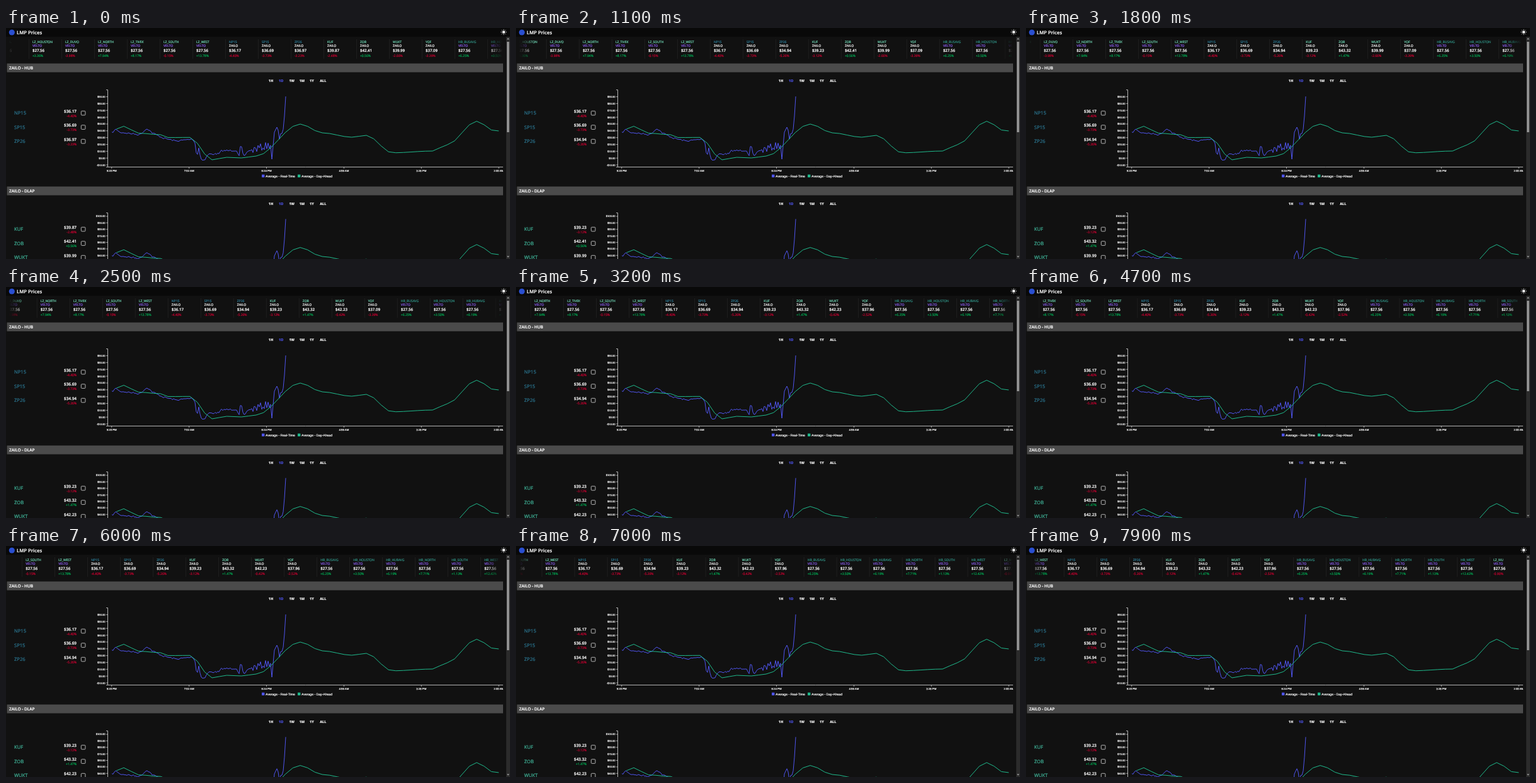
An HTML page with a canvas that plays this animation: 800 px wide and 368 px high, repeating every 8000 ms.

```html
<!DOCTYPE html>
<html lang="en">
<head>
<meta charset="utf-8">
<title>LMP Prices</title>
<style>
html, body { margin: 0; width: 100%; height: 100%; overflow: hidden; background: #111; }
canvas { display: block; }
</style>
</head>
<body>
<canvas id="stage" width="800" height="368"></canvas>
<script>
const ctx = document.getElementById('stage').getContext('2d');
ctx.textRendering = 'geometricPrecision';

const LOOP = 8000, STEP = 100, PITCH = 52, SPEED = 36.46;
const BG = '#111', BLUE = '#4f55ee', GREEN = '#1fb98c', RED = '#c4002f', UP = '#00a651';
const UI = '"Open Sans", "Noto Sans", sans-serif', ARIAL = '"Liberation Sans", Arial, sans-serif';
const COLORS = { LZ: '#6fd6b4', HB: '#2f8d80', hub: '#2b7a94' };

// update: [time, price, change]
const local = (name, kind, price, pct, update) => ({ name, op: 'ZAILO', kind, price, pct, update });
const grid = entry => {
  const [name, pct] = entry.split(' ');
  return { name, op: 'VELTO', kind: name.slice(0, 2), price: 27.56, pct: +pct };
};
const hubs = [
  local('NP15', 'hub', 36.17, -4.40),
  local('SP15', 'hub', 36.69, -3.73),
  local('ZP26', 'hub', 36.97, -3.23, [400, 34.94, -5.26])
];
const areas = [
  local('KUF', 'LZ', 39.87, -2.48, [800, 39.23, -3.12]),
  local('ZOB', 'LZ', 42.41, 0.56, [1500, 43.32, 1.47]),
  local('WUKT', 'LZ', 39.99, -2.66, [2000, 42.23, -0.42]),
  local('YOF', 'LZ', 37.09, -3.39, [2900, 37.96, -2.52])
];
const ticker = [
  ...['LZ_MOL 1.20', 'LZ_HOUSTON 3.36', 'LZ_DUVO -3.98', 'LZ_NORTH 7.94', 'LZ_TIVEK 8.17',
    'LZ_SOUTH -0.15', 'LZ_WEST 13.78'].map(grid),
  ...hubs, ...areas,
  ...['HB_BUSAVG 6.25', 'HB_HOUSTON 3.50', 'HB_HUBAVG 6.19', 'HB_NORTH 7.71', 'HB_SOUTH 1.13',
    'HB_WEST 12.42', 'LZ_IVU -0.90', 'LZ_MOL 1.20'].map(grid)
];

let seed = 7;
const random = () => (seed = seed * 16807 % 2147483647) / 2147483647;
const smooth = p => p * p * (3 - 2 * p);

// Height at x between the key points around it
function heightAt(keys, x, ease) {
  const i = Math.max(1, keys.findIndex(k => k[0] >= x));
  const [x0, y0] = keys[i - 1], [x1, y1] = keys[i];
  return y0 + (y1 - y0) * ease((x - x0) / (x1 - x0));
}

// Day-ahead: one point per hour, eased between its turning points
const turns = [[175, 161], [187, 156.5], [210, 167.5], [245, 170], [258, 174.5], [292, 174.3],
  [327, 210], [350, 206], [374, 207], [397, 204], [467, 153], [502, 167], [549, 174], [572, 171],
  [613, 198.8], [677, 196], [700, 186], [747, 148.5], [776, 164], [783, 164]];
const aheadLine = Array.from({ length: 53 }, (_, hour) => {
  const x = 175.3 + hour * 11.67;
  return [x, heightAt(turns, x, smooth)];
});

// Real-time: straight runs with jitter, wilder just before the final spike
const runs = [[168, 167], [175, 161], [180, 166], [201, 168.5], [212, 170], [224, 160], [232, 167],
  [250, 175.5], [270, 180], [296, 177], [300, 183], [303, 206], [306, 191], [309, 208], [315, 211],
  [321, 201], [338, 200.5], [342, 195.5], [366, 195], [370, 204], [372, 190], [374, 190], [377, 206],
  [384, 196], [420, 186], [422, 209], [426, 166], [431, 156], [434, 177], [437, 164], [439, 172],
  [442, 140], [444, 109]];
const realLine = Array.from({ length: 139 }, (_, i) => {
  const x = 168 + i * 2;
  const jitter = x > 420 ? 0 : x > 390 ? 12 : 2.6;
  return [x, heightAt(runs, x, p => p) + (random() - 0.5) * jitter];
});

function text(s, x, y, size, color = '#fff', weight = 400, align = 'left', font = UI) {
  ctx.font = `${weight} ${size}px ${font}`;
  ctx.fillStyle = ctx.strokeStyle = color;
  ctx.textAlign = align;
  ctx.lineWidth = 0.2;
  ctx.fillText(s, x, y + size * 0.36);
  ctx.strokeText(s, x, y + size * 0.36);
}
function rect(x, y, w, h, color) {
  ctx.fillStyle = color;
  ctx.fillRect(x, y, w, h);
}
function line(points, color, width = 1) {
  ctx.beginPath();
  points.forEach(p => ctx.lineTo(...p));
  ctx.strokeStyle = color;
  ctx.lineWidth = width;
  ctx.lineJoin = 'round';
  ctx.stroke();
}
function disc(x, y, r, color) {
  ctx.beginPath();
  ctx.arc(x, y, r, 0, 7);
  ctx.fillStyle = color;
  ctx.fill();
}
function quote(it, t) {
  const [, price, pct] = it.update && t >= it.update[0] ? it.update : [0, it.price, it.pct];
  return {
    price: '$' + price.toFixed(2),
    pct: (pct > 0 ? '+' : '') + pct.toFixed(2) + '%',
    color: pct > 0 ? UP : RED
  };
}

function drawTicker(t) {
  ctx.save();
  ctx.beginPath();
  ctx.rect(5, 15, 783, 37);
  ctx.clip();
  ticker.forEach((it, i) => {
    const x = 354 + (i - 7) * PITCH - SPEED * t / 1000, q = quote(it, t);
    rect(x - 6, 18, 0.6, 31, '#292929');
    text(it.name, x, 22, 5, COLORS[it.kind]);
    text(it.op, x, 28.6, 5, it.op === 'VELTO' ? '#8058dc' : '#eee', 600);
    text(q.price, x, 36, 6.1, '#fff', 600);
    text(q.pct, x, 43.7, 5, q.color);
  });
  [[5, 30], [788, 763]].forEach(([edge, inner]) => {
    const fade = ctx.createLinearGradient(edge, 0, inner, 0);
    fade.addColorStop(0, BG);
    fade.addColorStop(1, 'rgba(17,17,17,0)');
    rect(Math.min(edge, inner), 15, 25, 37, fade);
  });
  ctx.restore();
}

function drawRow(it, y, t) {
  const q = quote(it, t);
  text(it.name, 13, y, 7.6, it.kind === 'hub' ? '#2b7590' : '#40b59a');
  text(q.price, 112, y - 3, 6.4, '#fff', 600, 'right');
  text(q.pct, 112, y + 4.5, 5, q.color, 400, 'right');
  ctx.beginPath();
  ctx.roundRect(119.3, y - 3.2, 6.6, 6.6, 1);
  ctx.strokeStyle = '#b5b5b5';
  ctx.lineWidth = 1;
  ctx.stroke();
}

function drawSection(title, top, rows, firstRow, t) {
  rect(1.5, top, 787.5, 14, '#4b4b4b');
  text(title, 5, top + 7, 6.5, '#fff', 600);
  ['1H', '1D', '1W', '1M', '1Y', 'ALL'].forEach((s, i) =>
    text(s, 416.8 + i * 16.3, top + 27.5, 5.5, s === '1D' ? BLUE : '#fff', 700));
  rows.forEach((it, i) => drawRow(it, firstRow + i * 22.5, t));
}

// First label sits at y0; values fall by ten per gap
function drawAxis(top, bottom, max, min, y0, gap) {
  line([[159, top], [161.5, top], [161.5, bottom], [159, bottom]], '#ddd', 0.8);
  for (let v = max, y = y0; v >= min; v -= 10, y += gap) {
    line([[159, y], [161.5, y]], '#ddd', 0.7);
    text((v < 0 ? '-$' : '$') + Math.abs(v).toFixed(2), 157.6, y, 4.1, '#fff', 400, 'right', ARIAL);
  }
}
function drawLines(mapY) {
  const move = pts => pts.map(([x, y]) => [x, mapY(y)]);
  line(move(realLine), BLUE);
  line(move(aheadLine), GREEN);
}

function drawCharts() {
  ctx.save();
  ctx.beginPath();
  ctx.rect(0, 70, 789, 298);
  ctx.clip();
  drawAxis(98.5, 221.5, 90, -10, 109.5, 10.86);
  line([[161.5, 221.5], [789, 221.5]], '#ddd', 0.8);
  ['9:20 PM', '7:52 AM', '6:24 PM', '4:56 AM', '3:28 PM', '2:00 AM'].forEach((s, i) => {
    const x = 167.7 + i * 122.9;
    line([[x, 221.5], [x, 224]], '#ddd', 0.7);
    text(s, x, 227.2, 4.3, '#fff', 400, 'center', ARIAL);
  });
  drawLines(y => y);
  [['Average - Real-Time', 406, BLUE], ['Average - Day-Ahead', 463, GREEN]].forEach(([s, x, color]) => {
    rect(x, 233.5, 4.4, 4.4, color);
    text(s, x + 6.1, 235.8, 5.1, '#fff', 400, 'left', ARIAL);
  });

  drawAxis(294.5, 380, 100, 40, 300, 10.38);
  drawLines(y => 345 + (y - 148.5) * 1.03);
  ctx.restore();
}

function drawChrome() {
  rect(0, 0, 800, 14, '#090909');
  disc(9.3, 7, 4.6, '#2a4fd0');
  text('LMP Prices', 17, 7, 7.7, '#fff', 600);
  disc(790, 6.5, 2.2, '#fff');
  for (let a = 0; a < 8; a++) {
    const c = Math.cos(a * Math.PI / 4), s = Math.sin(a * Math.PI / 4);
    line([[790 + 3.1 * c, 6.5 + 3.1 * s], [790 + 4.5 * c, 6.5 + 4.5 * s]], '#fff', 0.9);
  }
  rect(794, 14, 6, 354, '#2b2b2b');
  rect(795.2, 22, 3.4, 144, '#9b9b9b');
  [[17, 1], [364.5, -1]].forEach(([y, d]) => {
    ctx.beginPath();
    ctx.moveTo(795, y + d * 1.3);
    ctx.lineTo(797, y - d * 1.3);
    ctx.lineTo(799, y + d * 1.3);
    ctx.fillStyle = '#9b9b9b';
    ctx.fill();
  });
}

function draw(now) {
  const t = Math.floor(now % LOOP / STEP) * STEP;
  rect(0, 0, 800, 368, BG);
  drawTicker(t);
  drawSection('ZAILO - HUB', 56.5, hubs, 135.5, t);
  drawSection('ZAILO - DLAP', 252.5, areas, 320.5, t);
  drawCharts();
  drawChrome();
}

const start = performance.now();
(function frame() {
  draw(performance.now() - start);
  requestAnimationFrame(frame);
})();
</script>
</body>
</html>
```
